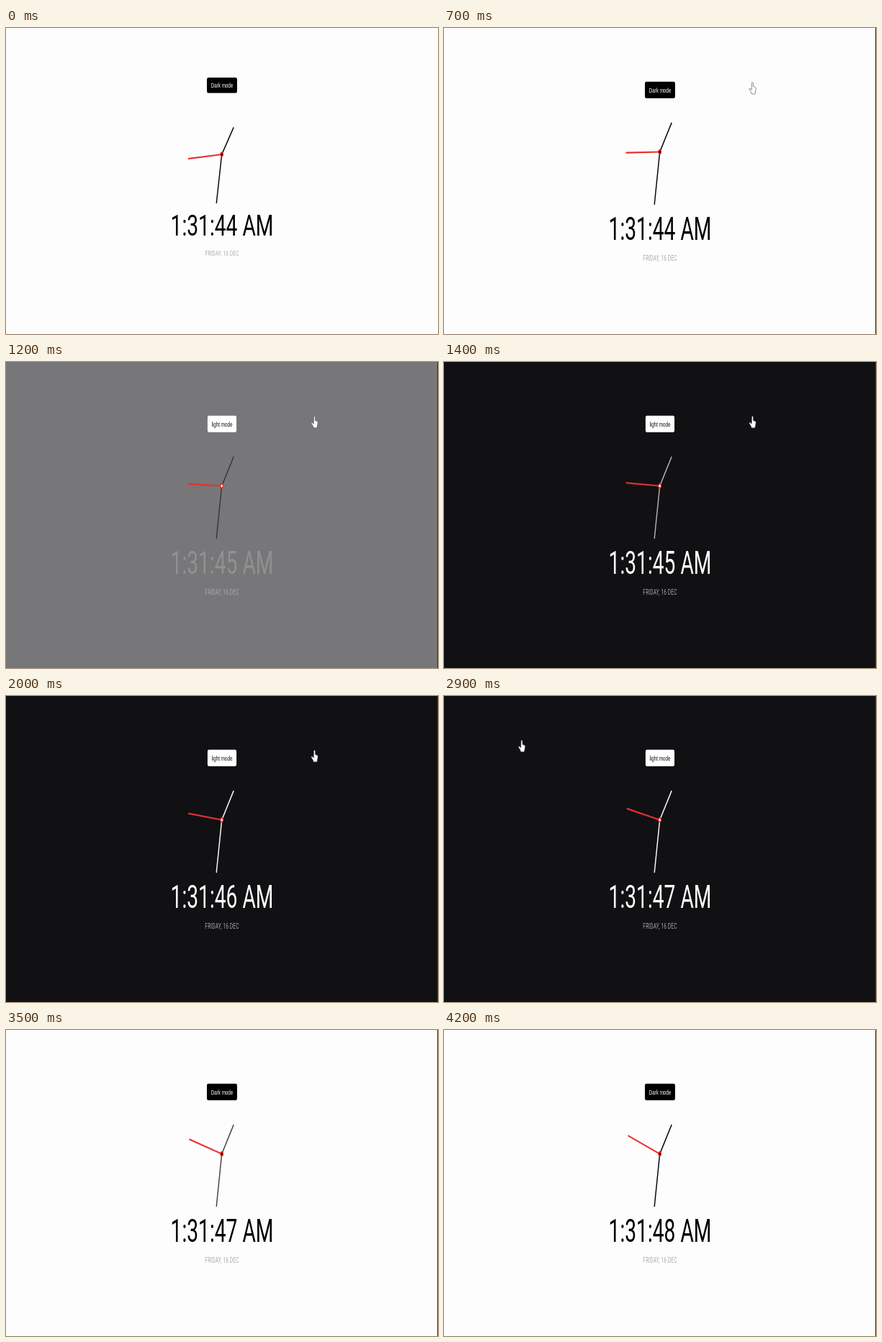
Animation of 600x426 px, one loop 4300 ms. Source, as an HTML page:

```html
<!DOCTYPE html>
<html lang="en">
<head>
<meta charset="utf-8">
<title>Theme clock</title>
<style>
  html, body { margin: 0; width: 100%; height: 100%; overflow: hidden; }
  svg { display: block; width: 600px; height: 426px; }
  text { text-anchor: middle; }
  .time { font: 400 60px Roboto, sans-serif; }
  .date { font: 400 14px Roboto, sans-serif; letter-spacing: .3px; fill: #aaa; }
  .label { font: 400 13.333px "Liberation Sans", Arial, sans-serif; }
  .hand { stroke-width: 3; }
  .red { stroke: #e5302f; }
</style>
</head>
<body>
<svg viewBox="0 0 600 426">
  <rect id="page" width="600" height="426"/>
  <g id="toggle">
    <rect id="box" y="-15.5" height="31" rx="4"/>
    <text id="label" class="label" y="4.7"></text>
  </g>
  <g id="clock">
    <line id="hour" class="hand" y2="-65"/>
    <line id="minute" class="hand" y2="-100"/>
    <line id="second" class="hand red" y2="-100"/>
    <circle r="5" fill="#e5302f"/>
    <circle id="pin" r="2.5"/>
  </g>
  <g id="timeRow"><text id="time" class="time"></text></g>
  <g id="dateRow"><text class="date">FRIDAY, 16 DEC</text></g>
  <rect id="edge" x="599" width="1" height="426" fill="#333"/>
  <path id="cursor" fill="#fff" stroke="#444" stroke-width=".6" stroke-linejoin="round"
    d="M-.8-7.5Q.3-8.6 1.1-7.3L1.3-2 4-1Q5-.5 4.9 1L4.2 5.5 3.5 8.3H-1.2L-1.8 6-4.2 2Q-4.6.3-3.2.6L-1 2.6Z"/>
</svg>
<script>
const LOOP = 4300, STEP = 100, FADE = 500;
const GO_DARK = 845, GO_LIGHT = 2933, HAND_LAG = 150;
const SCALE_X = .47;
const WIDE = { sy: .69, toggle: 79.8, clock: 176, timeRow: 289.4, dateRow: 316.8 };
const FULL = { sy: .745, toggle: 86.3, clock: 172.5, timeRow: 294.6, dateRow: 324 };

const $ = id => document.getElementById(id);
const set = (id, attrs) => {
  for (const name in attrs) $(id).setAttribute(name, attrs[name]);
};
const clamp = x => Math.min(1, Math.max(0, x));

// cubic-bezier(.42, 0, 1, 1)
function easeIn(x) {
  if (x <= 0 || x >= 1) return clamp(x);
  let lo = 0, hi = 1, u;
  for (let i = 0; i < 24; i++) {
    u = (lo + hi) / 2;
    const bx = 1.26 * u * (1 - u) ** 2 + 3 * u * u * (1 - u) + u ** 3;
    if (bx < x) lo = u; else hi = u;
  }
  return 3 * u * u - 2 * u ** 3;
}

const darkness = t => easeIn((t - GO_DARK) / FADE) - easeIn((t - GO_LIGHT) / FADE);
const mix = (a, b, p) => `rgb(${a.map((v, i) => Math.round(v + (b[i] - v) * p))})`;
const ink = p => mix([0, 0, 0], [255, 255, 255], p);

function render(t) {
  const view = t < 100 ? WIDE : FULL;
  for (const id of ["toggle", "clock", "timeRow", "dateRow"]) {
    const x = id === "clock" ? 299.7 : 300;
    set(id, { transform: `translate(${x} ${view[id]}) scale(${SCALE_X} ${view.sy})` });
  }
  set("edge", { visibility: t < 100 ? "hidden" : "visible" });

  const dark = t >= GO_DARK && t < GO_LIGHT;
  const p = darkness(t);
  set("page", { fill: mix([254, 253, 254], [17, 16, 18], p) });
  set("time", { fill: ink(p) });
  set("pin", { fill: dark ? "#fff" : "#000" });

  const width = dark ? 85.5 : 89.2;
  set("box", { x: -width / 2, width, fill: dark ? "#fff" : "#000" });
  set("label", { fill: dark ? "#111" : "#fff" });
  $("label").textContent = dark ? "light mode" : "Dark mode";

  const handInk = ink(darkness(t - HAND_LAG));
  set("hour", { stroke: handInk, transform: `rotate(${360 / 11})` });
  set("minute", { stroke: handInk, transform: `rotate(${31 / 59 * 360})` });
  set("second", { transform: `rotate(${265 + t * .00595})` });
  $("time").textContent = `1:31:${44 + Math.floor((t + 200) / 1000)} AM`;

  const move = clamp((t - 2400) / 500);
  set("cursor", {
    transform: `translate(${428.3 - 320.5 * move} ${83.5 - 14 * move})`,
    visibility: t >= 600 && t < 3400 ? "visible" : "hidden"
  });
}

function tick() {
  render(Math.floor(performance.now() % LOOP / STEP) * STEP);
  requestAnimationFrame(tick);
}
tick();
</script>
</body>
</html>
```
